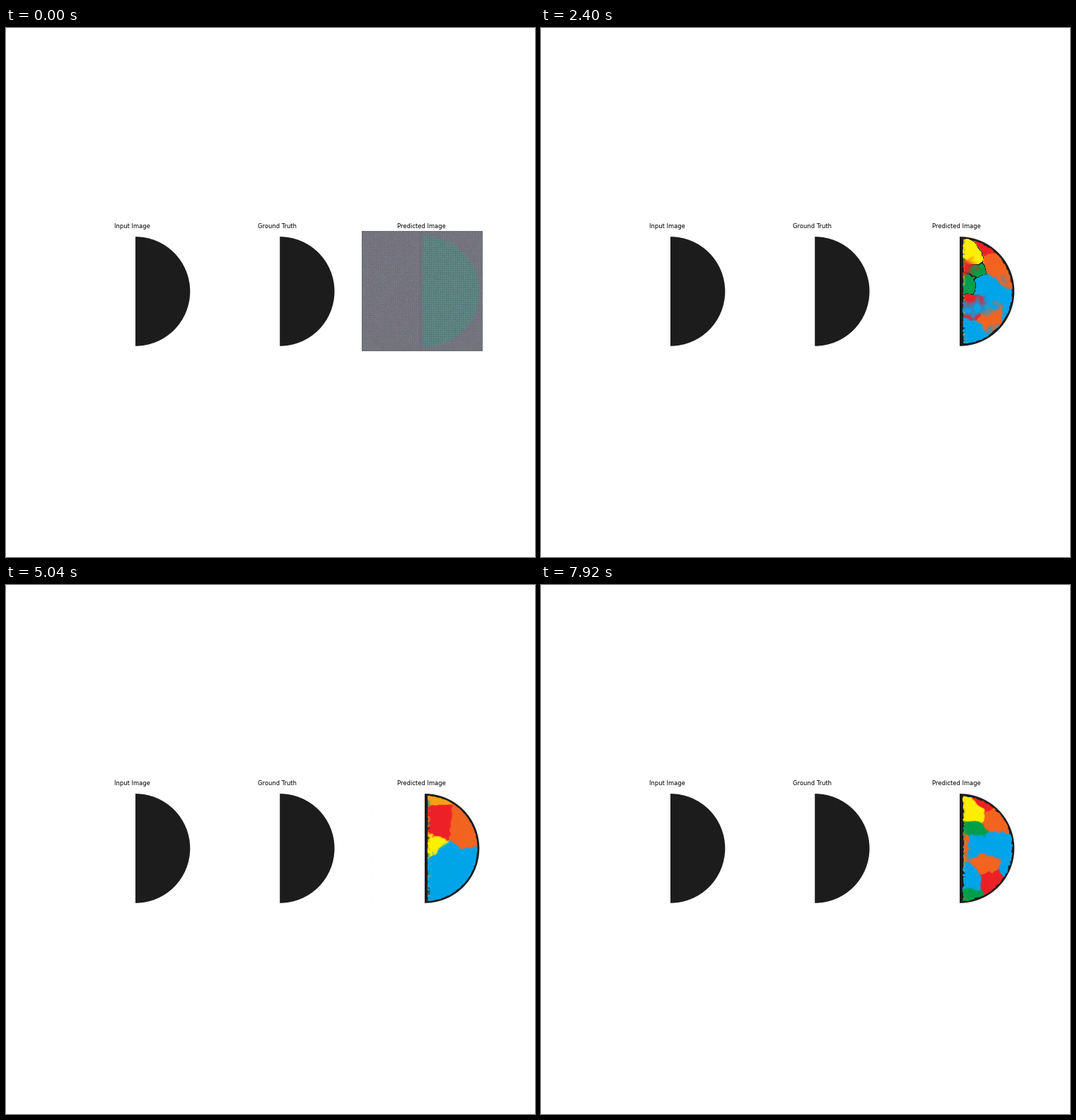
Write a matplotlib script that moves like this. It is 748x748 px and loops after 8000 ms.

```python
import numpy as np
import matplotlib.pyplot as plt
from matplotlib.animation import FuncAnimation
from matplotlib.patches import Wedge

SIZE, DPI = 748, 50
X0, Y0, W, H = 503, 287, 171, 170      # predicted panel
CX, CY, R = 592, 372.4, 77.3           # its half disc
STEP_MS, TICK_MS, LOOP_MS = 240, 80, 8000
INK = np.array([28, 28, 28.0])

COLORS = {
    "red": (236, 32, 38), "orange": (243, 100, 32), "amber": (250, 160, 20),
    "yellow": (255, 240, 0), "green": (0, 158, 72), "teal": (20, 150, 150),
    "blue": (0, 165, 233),
}

# Each scene is a few coloured centres; every pixel takes its nearest one.
SEA = [("orange", 648, 338), ("blue", 648, 404), ("blue", 612, 388)]
PATCHY = SEA + [("yellow", 604, 310), ("red", 618, 334), ("blue", 628, 361)]
SPLIT = SEA + [("red", 609, 336), ("yellow", 598, 372), ("amber", 609, 288)]
WARM = SEA + [("orange", 616, 336), ("yellow", 598, 372), ("amber", 598, 318)]
CLEAN = SEA + [("red", 613, 328), ("amber", 607, 358), ("blue", 628, 362)]
GLOBE = [
    ("yellow", 612, 326), ("red", 634, 306), ("orange", 642, 332),
    ("green", 614, 344), ("green", 606, 359), ("blue", 622, 362),
    ("blue", 650, 368), ("red", 612, 393), ("orange", 637, 408),
    ("blue", 668, 408), ("blue", 607, 432), ("blue", 640, 456),
]
BLOCKS = [
    ("yellow", 613, 324), ("red", 633, 305), ("orange", 640, 330),
    ("green", 612, 346), ("orange", 598, 364), ("blue", 612, 364),
    ("blue", 640, 370), ("orange", 632, 396), ("red", 638, 417),
    ("blue", 606, 418), ("blue", 664, 398), ("green", 606, 442),
]

# Step, scene, roughness of the rim, width of dark seams
KEYS = [(0, PATCHY, 0.5, 0), (6, PATCHY, 0.4, 0), (13, GLOBE, 1, 2),
        (21, SPLIT, 0.3, 0), (25, WARM, 0.3, 0), (29, CLEAN, 0.2, 0),
        (33, BLOCKS, 1, 0)]

X, Y = np.meshgrid(np.arange(W) + X0 + 0.5, np.arange(H) + Y0 + 0.5)
RAD = np.hypot(X - CX, Y - CY)
DISC = np.clip(R - RAD + 0.5, 0, 1) * np.clip(X - CX + 0.5, 0, 1)


def mix(a, b, w):
    w = np.asarray(w)[..., None]
    return a * (1 - w) + b * w


def noise(seed, cell):
    """Smooth random field in 0..1."""
    grid = np.random.default_rng(seed).random((H // cell + 3, W // cell + 3))
    u, v = (X - X0) / cell, (Y - Y0) / cell
    i, j = u.astype(int), v.astype(int)
    fu, fv = u - i, v - j
    top = grid[j, i] * (1 - fu) + grid[j, i + 1] * fu
    low = grid[j + 1, i] * (1 - fu) + grid[j + 1, i + 1] * fu
    return top * (1 - fv) + low * fv


def paint(scene, seam, seed):
    """Soft nearest-centre regions with ragged edges."""
    wx = X + 6 * (noise(seed, 5) - 0.5)
    wy = Y + 6 * (noise(seed + 1, 5) - 0.5)
    dist = np.array([np.hypot(wx - x, wy - y) for _, x, y in scene])
    tints = np.array([COLORS[name] for name, _, _ in scene], float)
    weight = np.exp((dist.min(0) - dist) / 0.8)
    img = np.tensordot(weight / weight.sum(0), tints, (0, 0))
    if seam:
        outlined = np.array([name in ("yellow", "green") for name, _, _ in scene])
        near = np.sort(dist, axis=0)
        line = np.clip(seam - (near[1] - near[0]), 0, 1)
        img = mix(img, INK, line * outlined[dist.argmin(0)])
    return img


def fog():
    """Untrained output: grey weave with a teal half disc."""
    weave = np.cos(X * np.pi * 0.75) + np.cos(Y * np.pi * 0.75)
    grain = np.random.default_rng(5).normal(0, 5, (H, W, 3))
    img = np.array([117, 116, 127.0]) + weave[..., None] * [5, 4, 3] + grain
    shade = np.clip((80 - np.hypot(X - 591, Y - 373)) / 3, 0, 1) * (X > 589)
    teal = np.array([92, 130, 128.0]) + weave[..., None] * [9, 12, 6] + grain
    img = mix(img, teal, shade)
    img = mix(img, np.array([104, 104, 124.0]), 0.4 * ((X > 584) & (X < 589)))
    edge = (X < X0 + 1) | (X > X0 + W - 1) | (Y < Y0 + 1) | (Y > Y0 + H - 1)
    img[edge] = (98, 112, 104)
    return img


def predict(step):
    k = max(i for i, key in enumerate(KEYS[:-1]) if key[0] <= step)
    (s0, a, rough0, seam0), (s1, b, rough1, seam1) = KEYS[k], KEYS[k + 1]
    p = (step - s0) / (s1 - s0)
    seed = 100 + 10 * step
    field = 0.7 * noise(k, 18) + 0.3 * noise(k + 50, 6)
    w = np.clip((1.3 * p - field) / 0.3, 0, 1)
    color = mix(paint(a, seam0, seed), paint(b, seam1, seed), w)
    rough = rough0 + (rough1 - rough0) * p

    # Streaks along the straight side
    speck = noise(seed + 2, 3)
    tints = np.array([INK] + [COLORS[c] for c in ("amber", "teal", "green")])
    streak = tints[(noise(seed + 3, 5) * 3.99).astype(int)]
    color = mix(color, streak, np.clip((601 - X) / 4, 0, 1) * (speck > 0.45) * 0.7)

    ragged = rough * 3 * (speck - 0.4)
    rim = np.clip(RAD + ragged - R + 3.2, 0, 1)
    bar = np.clip(596.3 + rough + ragged - X, 0, 1)
    color = mix(color, INK, np.maximum(rim, bar))

    paper = np.full((H, W, 3), 255.0)
    dots = ((X - 518.5) % 6 < 1) & ((Y - 302.5) % 7 < 1) & (X > 518) & (Y > 302)
    paper[dots] = 244
    img = mix(paper, color, DISC)
    haze = 0.4 ** step if step < 4 else 0
    img = mix(img, fog(), np.full((H, W), haze))
    return np.clip(img, 0, 255).astype(np.uint8)


steps = [predict(s) for s in range(KEYS[-1][0] + 1)]

fig = plt.figure(figsize=(SIZE / DPI, SIZE / DPI), dpi=DPI, facecolor="white")
ax = fig.add_axes([0, 0, 1, 1])
panel = ax.imshow(steps[0], extent=(X0, X0 + W, Y0 + H, Y0),
                  interpolation="nearest", aspect="auto")
ax.set_xlim(0, SIZE)
ax.set_ylim(SIZE, 0)
ax.axis("off")

for x in (183, 387.2):
    ax.add_patch(Wedge((x, CY), R, -90, 90, facecolor="#1c1c1c", linewidth=0))
for i, label in enumerate(("Input Image", "Ground Truth", "Predicted Image")):
    ax.text(178.9 + 204.5 * i, 282.7, label, family="DejaVu Sans", size=12,
            color="black", ha="center", va="baseline")


def update(i):
    panel.set_data(steps[i * TICK_MS // STEP_MS])
    return (panel,)


anim = FuncAnimation(fig, update, frames=LOOP_MS // TICK_MS, interval=TICK_MS,
                     repeat=True, repeat_delay=0, cache_frame_data=False)
plt.show()
```
